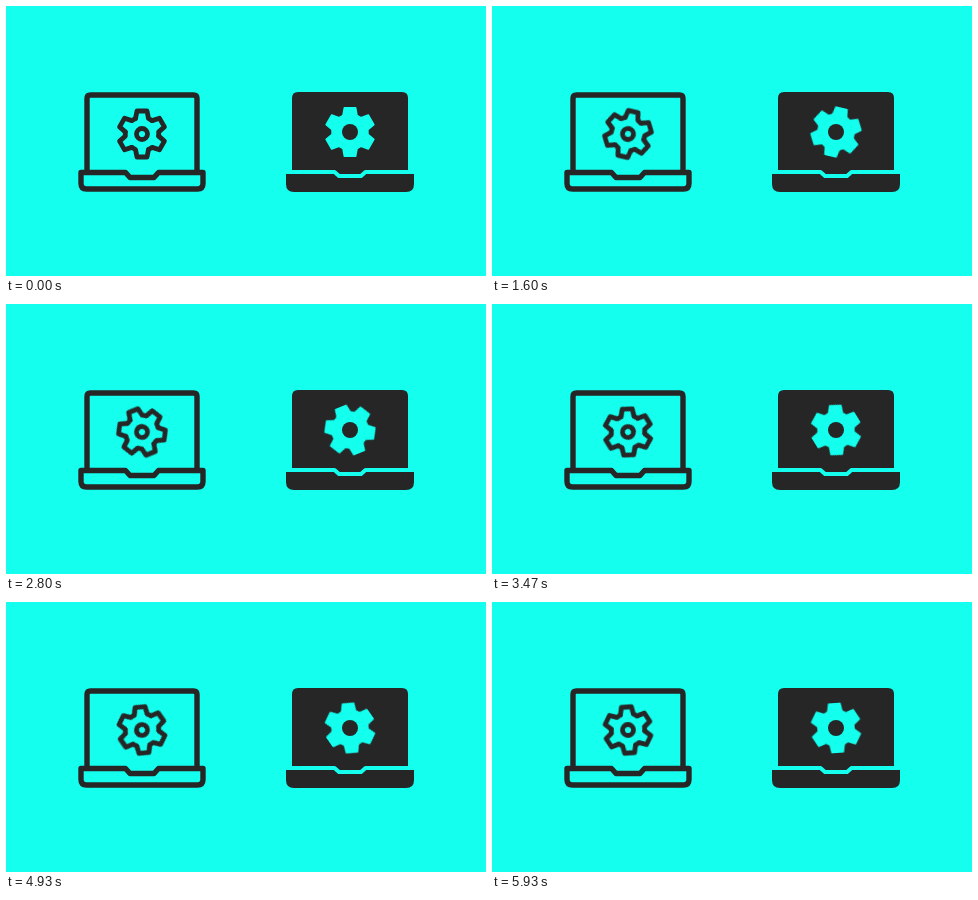
Recreate the animation shown at these times as an HTML page without scripts. Size 480 by 270 pixels, loop 5.99 s.

```html
<!DOCTYPE html>
<html lang="en">
<head>
<meta charset="utf-8">
<title>Laptop settings icons</title>
<style>
  :root { --bg: #14ffee; --ink: #262626; }
  html, body { margin: 0; width: 100%; height: 100%; overflow: hidden; background: var(--bg); }
  svg { display: block; width: 100%; height: 100%; }
  .line { fill: none; stroke: var(--ink); stroke-width: 5.4; stroke-linecap: round; stroke-linejoin: round; }
  .ink { fill: var(--ink); }
  .cut { fill: var(--bg); stroke: var(--bg); stroke-width: 1.6; stroke-linejoin: round; }
  .gap { fill: none; stroke: var(--bg); stroke-width: 4; stroke-linejoin: round; }
  .thin { stroke-width: 4.8; }
  /* two turns, shown at 15 pictures a second */
  .spin { transform-origin: 0 0; animation: spin 5.99s steps(90, end) -3ms infinite; }
  @keyframes spin { to { transform: rotate(724.02deg); } }
</style>
</head>
<body>
<svg viewBox="0 0 480 270">
  <defs>
    <path id="rim" d="M-6.5-15.5L-5-23H5L6.5-15.5L10.2-13.4"/>
    <path id="tooth" d="M0 0L-7-16.6L-5.6-24.3H5.6L7-16.6L10.9-14.4Z"/>
    <g id="rims">
      <use href="#rim"/>
      <use href="#rim" transform="rotate(60)"/>
      <use href="#rim" transform="rotate(120)"/>
      <use href="#rim" transform="rotate(180)"/>
      <use href="#rim" transform="rotate(240)"/>
      <use href="#rim" transform="rotate(300)"/>
    </g>
    <g id="teeth">
      <use href="#tooth"/>
      <use href="#tooth" transform="rotate(60)"/>
      <use href="#tooth" transform="rotate(120)"/>
      <use href="#tooth" transform="rotate(180)"/>
      <use href="#tooth" transform="rotate(240)"/>
      <use href="#tooth" transform="rotate(300)"/>
    </g>
  </defs>

  <!-- outline laptop -->
  <g class="line">
    <path d="M81 166V92.5Q81 89 84.5 89H187.5Q191 89 191 92.5V166"/>
    <path d="M75 166.5H119.5L124 171.5H148L152.5 166.5H197V177.5Q197 183 191.5 183H80.5Q75 183 75 177.5Z"/>
  </g>
  <g transform="translate(136 128)">
    <g class="line thin spin">
      <use href="#rims"/>
      <circle r="5.5"/>
    </g>
  </g>

  <!-- solid laptop -->
  <g class="ink">
    <path d="M286 168V92Q286 86 292 86H396Q402 86 402 92V168Z"/>
    <path d="M280 168H408V178Q408 186 400 186H288Q280 186 280 178Z"/>
  </g>
  <path class="gap" d="M278 166H328.5L333 170H355L359.5 166H410"/>
  <g transform="translate(344 126)">
    <g class="cut spin">
      <use href="#teeth"/>
      <circle r="15"/>
    </g>
    <circle class="ink" r="8"/>
  </g>
</svg>
</body>
</html>
```
